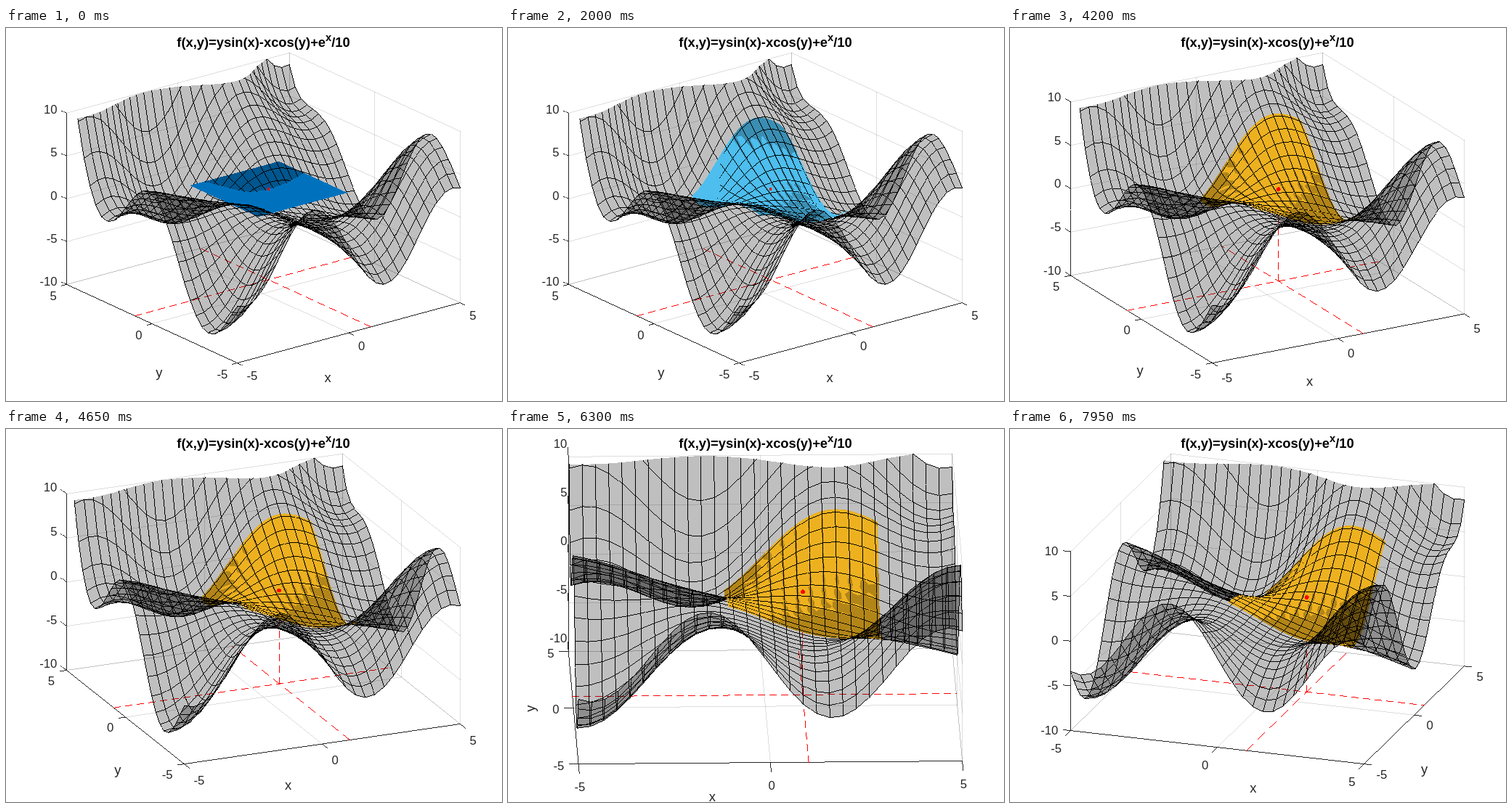
Animation, 683 px wide and 514 px high, one loop 8 s. Source, as an HTML page with a canvas:

```html
<!DOCTYPE html>
<html lang="en">
<head>
<meta charset="utf-8">
<title>Taylor approximation of a surface</title>
<style>
html, body { margin: 0; width: 100%; height: 100%; overflow: hidden; background: #fff; }
canvas, svg { position: absolute; left: 0; top: 0; width: 683px; height: 514px; }
text { font: 16.67px "Liberation Sans", Arial, sans-serif; fill: #262626; }
.label { font-size: 18.33px; text-anchor: middle; }
.title { font-size: 18.33px; font-weight: bold; fill: #000; text-anchor: middle; }
</style>
</head>
<body>
<canvas id="plot" width="683" height="514"></canvas>
<svg viewBox="0 0 683 514">
  <text class="title" x="354.5" y="26">f(x,y)=ysin(x)-xcos(y)+e<tspan dy="-8" font-size="14.7">x</tspan><tspan dy="8">/10</tspan></text>
  <g id="labels"></g>
</svg>
<script>
const W = 683, H = 514;
const BOX = { left: 83.2, right: 625.6, top: 34.2, bottom: 461.6 };
const COLORS = [[0, 114, 189], [217, 83, 25], [237, 177, 32], [126, 47, 142],
                [119, 172, 48], [77, 190, 238], [162, 20, 47]];
const RULER = [38, 38, 38], RED = [255, 0, 0], BLACK = [0, 0, 0];
const CELLS = 29, LINE_BIAS = 0.002, SHADE = 0.75;
const LOOP = 8000, DEGREE_MS = 400, TURN_START = 3600, TURN_MS = 150;

const ctx = document.getElementById('plot').getContext('2d');
const labels = document.getElementById('labels');
const image = ctx.createImageData(W, H);
const pixels = image.data;
const depth = new Float32Array(W * H);

// ---- mathematics
const surface = (x, y) => y * Math.sin(x) - x * Math.cos(y) + Math.exp(y) / 10;

// Taylor sum of a function at 1, given a rule for its n-th derivative there
function series(derivative, h, degree) {
  let sum = 0, term = 1;
  for (let n = 0; n <= degree; n++) {
    sum += derivative(n) * term;
    term *= h / (n + 1);
  }
  return sum;
}
const dSin = n => Math.sin(1 + n * Math.PI / 2);
const dCos = n => Math.cos(1 + n * Math.PI / 2);
const dExp = () => Math.E / 10;

function taylor(degree) {
  return (x, y) => {
    const h = x - 1, k = y - 1;
    return series(dSin, h, degree) + k * series(dSin, h, degree - 1)
         - series(dCos, k, degree) - h * series(dCos, k, degree - 1)
         + series(dExp, k, degree);
  };
}

function interpolate(xs, ys, x) {
  let i = 0;
  while (i < xs.length - 2 && x > xs[i + 1]) i++;
  const f = (x - xs[i]) / (xs[i + 1] - xs[i]);
  return ys[i] + Math.max(0, Math.min(1, f)) * (ys[i + 1] - ys[i]);
}

// ---- projection: orthographic, stretched to fill the box
function makeProjection(azimuth) {
  const a = azimuth * Math.PI / 180, e = Math.PI / 6;
  const ca = Math.cos(a), sa = Math.sin(a), ce = Math.cos(e), se = Math.sin(e);
  const spread = Math.abs(ca) + Math.abs(sa);
  const sx = (BOX.right - BOX.left) / spread;
  const sy = (BOX.bottom - BOX.top) / (se * spread + ce);
  const cx = (BOX.left + BOX.right) / 2, cy = (BOX.top + BOX.bottom) / 2;
  return (x, y, z) => {
    const u = x / 10, v = y / 10, w = z / 20;
    return [
      cx + sx * (u * ca + v * sa),
      cy - sy * (se * (v * ca - u * sa) + ce * w),
      ce * (sa * u - ca * v) + se * w,
      z
    ];
  };
}

// ---- rasteriser
function paint(i, color, alpha = 1) {
  for (let c = 0; c < 3; c++) {
    pixels[4 * i + c] += (color[c] - pixels[4 * i + c]) * alpha;
  }
}

function triangle(a, b, c, plot) {
  const bx = b[0] - a[0], by = b[1] - a[1], cx = c[0] - a[0], cy = c[1] - a[1];
  const area = bx * cy - cx * by;
  if (!area) return;
  const first = Math.max(0, Math.ceil(Math.min(a[1], b[1], c[1]) - 0.5));
  const last = Math.min(H, Math.max(a[1], b[1], c[1]) - 0.5);
  for (let y = first; y < last; y++) {
    const yc = y + 0.5, cuts = [];
    for (const [p, q] of [[a, b], [b, c], [c, a]]) {
      if ((p[1] <= yc) !== (q[1] <= yc)) {
        cuts.push(p[0] + (yc - p[1]) / (q[1] - p[1]) * (q[0] - p[0]));
      }
    }
    if (cuts.length < 2) continue;
    const end = Math.max(...cuts) - 0.5;
    for (let x = Math.ceil(Math.min(...cuts) - 0.5); x < end; x++) {
      const px = x + 0.5 - a[0], py = yc - a[1];
      const u = (px * cy - cx * py) / area, v = (bx * py - px * by) / area;
      const z = a[3] + u * (b[3] - a[3]) + v * (c[3] - a[3]);
      if (z <= 10) plot(y * W + x, a[2] + u * (b[2] - a[2]) + v * (c[2] - a[2]));
    }
  }
}

function line(a, b, color, { alpha = 1, dashed = false } = {}) {
  const n = Math.max(1, Math.round(Math.max(Math.abs(b[0] - a[0]), Math.abs(b[1] - a[1]))));
  for (let i = 0; i <= n; i++) {
    if (dashed && i % 16 >= 10) continue;
    const [x, y, d, z] = a.map((p, j) => p + (b[j] - p) * i / n);
    const px = Math.floor(x), py = Math.floor(y);
    if (z > 10 || px < 0 || px >= W || py < 0 || py >= H) continue;
    if (d + LINE_BIAS >= depth[py * W + px]) paint(py * W + px, color, alpha);
  }
}

function disc(p, radius, color) {
  for (let y = Math.floor(p[1] - 4); y < p[1] + 4; y++) {
    for (let x = Math.floor(p[0] - 4); x < p[0] + 4; x++) {
      if (Math.hypot(x + 0.5 - p[0], y + 0.5 - p[1]) < radius) paint(y * W + x, color);
    }
  }
}

function makeMesh(fn, from, to, project) {
  const at = i => from + (to - from) * i / CELLS;
  return Array.from({ length: CELLS + 1 }, (_, i) =>
    Array.from({ length: CELLS + 1 }, (_, j) => project(at(i), at(j), fn(at(i), at(j)))));
}

function fillMesh(mesh, plot) {
  for (let i = 0; i < CELLS; i++) {
    for (let j = 0; j < CELLS; j++) {
      triangle(mesh[i][j], mesh[i + 1][j], mesh[i][j + 1], plot);
      triangle(mesh[i + 1][j], mesh[i + 1][j + 1], mesh[i][j + 1], plot);
    }
  }
}

function strokeMesh(mesh) {
  mesh.forEach((row, i) => row.forEach((p, j) => {
    if (mesh[i + 1]) line(p, mesh[i + 1][j], BLACK);
    if (row[j + 1]) line(p, row[j + 1], BLACK);
  }));
}

// ---- axes
const label = (str, x, y, anchor) =>
  `<text x="${x.toFixed(1)}" y="${(y + 6).toFixed(1)}" text-anchor="${anchor}">${str}</text>`;

function drawAxes(project, azimuth) {
  const side = azimuth < 0 ? -1 : 1, tilt = Math.abs(azimuth), facing = tilt < 4;
  const wall = -5 * side, zCornerY = -5 * side;
  const reach = 20 - 0.16 * tilt;
  const grid = (a, b) => line(project(...a), project(...b), RULER, { alpha: 0.15 });
  const ruler = (a, b) => line(project(...a), project(...b), RULER);
  let markup = '';

  // draws the tick and returns its direction and label anchor
  function tick(at, inner) {
    const p = project(...at), q = project(...inner);
    const len = Math.hypot(p[0] - q[0], p[1] - q[1]);
    const dx = (p[0] - q[0]) / len, dy = (p[1] - q[1]) / len, size = reach - 7;
    line(p, [p[0] + dx * size, p[1] + dy * size, p[2], p[3]], RULER);
    return { dx, x: p[0] + dx * reach, y: p[1] + dy * reach };
  }

  for (const t of [-5, 0, 5]) {
    grid([t, -5, -10], [t, 5, -10]);
    grid([t, 5, -10], [t, 5, 10]);
    grid([-5, t, -10], [5, t, -10]);
    grid([wall, t, -10], [wall, t, 10]);
  }
  for (let z = -10; z <= 10; z += 5) {
    grid([-5, 5, z], [5, 5, z]);
    grid([wall, -5, z], [wall, 5, z]);
  }
  ruler([-5, -5, -10], [5, -5, -10]);
  ruler([5 * side, -5, -10], [5 * side, 5, -10]);
  ruler([-5, zCornerY, -10], [-5, zCornerY, 10]);

  for (const t of [-5, 0, 5]) {
    const x = tick([t, -5, -10], [t, 5, -10]);
    markup += label(t, x.x, x.y + 12, x.dx > 0.5 ? 'start' : x.dx < -0.5 ? 'end' : 'middle');
    const y = tick([5 * side, t, -10], [-5 * side, t, -10]);
    markup += label(t, y.x, y.y + (facing ? 2 : 12), side < 0 ? 'end' : 'start');
  }
  for (let z = -10; z <= 10; z += 5) {
    const inner = side < 0 ? [-5, -5, z] : [5, -5, z];
    const p = tick([-5, zCornerY, z], inner);
    markup += label(z, p.x, p.y + 1, 'end');
  }

  const stops = [1.5, 6.85, 18.85, 23.15, 37.5];
  const offset = values => interpolate(stops, values, tilt);
  const xMid = project(0, -5, -10), yMid = project(5 * side, 0, -10);
  const xx = xMid[0] + side * offset([80, 67, 49.5, 47, 29]);
  const xy = xMid[1] + offset([48, 52, 57, 58, 63]) + 5;
  const yx = yMid[0] + side * offset([56, 36, 14, 10.5, -10]);
  const yy = yMid[1] + (facing ? 1 : offset([90, 84, 78, 76, 70]));
  markup += `<text class="label" x="${xx}" y="${xy}">x</text>`;
  markup += `<text class="label" transform="translate(${yx} ${yy}) rotate(${facing ? -90 : 0})" y="3">y</text>`;
  labels.innerHTML = markup;
}

// ---- scene
function drawScene(degree, turn) {
  const azimuth = interpolate([0, 7, 18, 23, 29], [-37.5, -23.15, -1.5, 6.85, 18.85], turn);
  const project = makeProjection(azimuth);
  const color = COLORS[degree % COLORS.length];
  const height = surface(1, 1);
  pixels.fill(255);
  depth.fill(-9);

  fillMesh(makeMesh(taylor(degree), -1, 3, project), (i, d) => {
    if (d > depth[i]) {
      depth[i] = d;
      paint(i, color);
    }
  });

  drawAxes(project, azimuth);
  const dash = (a, b) => line(project(...a), project(...b), RED, { dashed: true });
  dash([-5, 1, -10], [5, 1, -10]);
  dash([1, -5, -10], [1, 5, -10]);
  if (turn > 0) dash([1, 1, -10], [1, 1, height]);

  // black at a fixed opacity darkens the same in any order, so no sorting is needed
  const mesh = makeMesh(surface, -5, 5, project);
  fillMesh(mesh, (i, d) => {
    if (d > depth[i]) paint(i, BLACK, 1 - SHADE);
  });
  strokeMesh(mesh);
  disc(project(1, 1, height), turn > 0 ? 2.9 : 2, RED);
  ctx.putImageData(image, 0, 0);
}

let shown = '';
const start = performance.now();

function frame(now) {
  const t = Math.max(0, now - start) % LOOP;
  const degree = Math.min(9, Math.floor(t / DEGREE_MS));
  const turn = Math.max(0, Math.floor((t - TURN_START) / TURN_MS));
  const key = degree + ':' + turn;
  if (key !== shown) {
    shown = key;
    drawScene(degree, turn);
  }
  requestAnimationFrame(frame);
}
frame(start);
</script>
</body>
</html>
```
